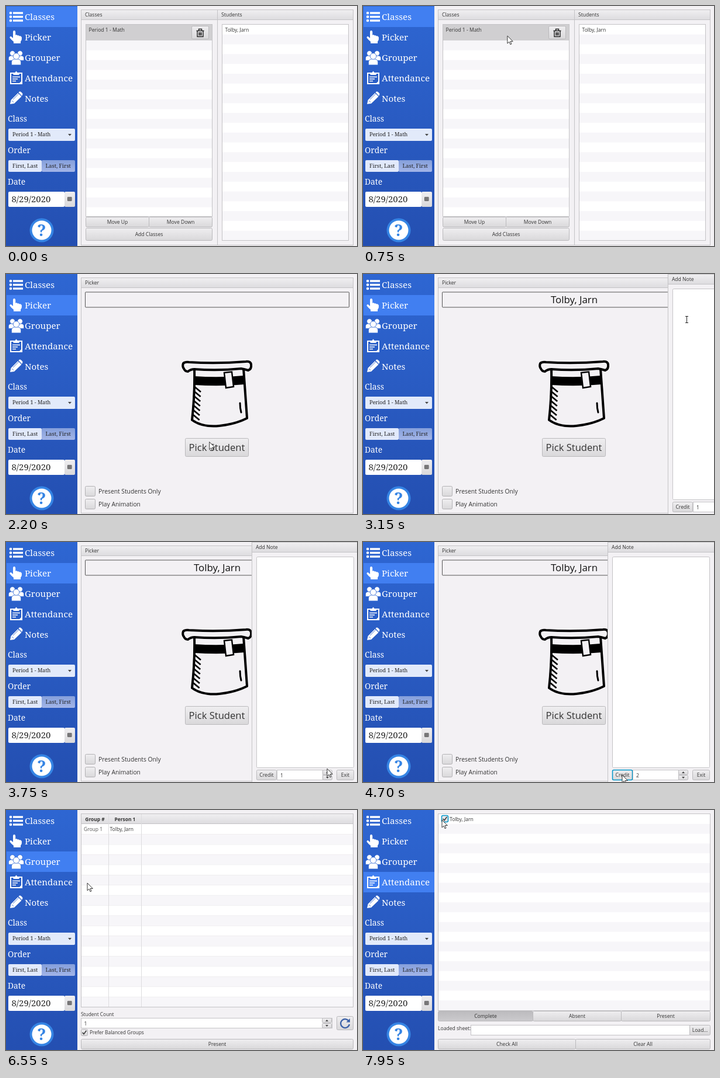
An HTML page for the animation above (8 s loop, 600 by 411 pixels).

```html
<!DOCTYPE html>
<html lang="en">
<head>
<meta charset="utf-8">
<title>Class manager</title>
<style>
html, body { margin: 0; width: 100%; height: 100%; overflow: hidden; background: #f3f1f4; }
svg { display: block; width: 100vw; height: 100vh; }
text { font-family: "Open Sans", "Noto Sans", sans-serif; white-space: pre; }
.serif { font-family: "Noto Serif", serif; }
</style>
</head>
<body>
<svg id="stage" viewBox="0 0 600 411" preserveAspectRatio="none"></svg>
<script>
const LOOP = 8000, STEP = 50;
const STUDENT = 'Tolby, Jarn', CLASS = 'Period 1 - Math';
const BG = '#f3f1f4', INK = '#333', LINE = '#c4c3c6', FOCUS = '#0096c9';
const TABS = ['Classes', 'Picker', 'Grouper', 'Attendance', 'Notes'];

// Markup helpers
const rect = (x, y, w, h, fill, stroke = 'none', more = '') =>
  `<rect x="${x}" y="${y}" width="${w}" height="${h}" fill="${fill}" stroke="${stroke}" ${more}/>`;
const box = (x, y, w, h, fill, stroke = LINE, r = 0) =>
  rect(x + .5, y + .5, w - 1, h - 1, fill, stroke, `rx="${r}"`);
const path = (d, fill = 'none', stroke = 'none', width = 1, more = '') =>
  `<path d="${d}" fill="${fill}" stroke="${stroke}" stroke-width="${width}" ${more}/>`;
const circle = (x, y, r, fill, more = '') => `<circle cx="${x}" cy="${y}" r="${r}" fill="${fill}" ${more}/>`;
const text = (x, y, s, size = 8.6, fill = INK, more = '') =>
  `<text x="${x}" y="${y}" font-size="${size}" fill="${fill}" ${more}>${s}</text>`;
const middle = (x, y, s, size, more = '') => text(x, y, s, size, INK, 'text-anchor="middle" ' + more);
const serif = (x, y, s, size, fill = '#fff') => text(x, y, s, size, fill, 'class="serif"');
const group = (id, body) => `<g id="${id}">${body}</g>`;
const button = (x, y, w, h, label = '', size = 8.6, fill = 'url(#btn)') =>
  box(x, y, w, h, fill, '#bab9bc', 2) + middle(x + w / 2, y + h / 2 + size * .36, label, size);
const header = (x, y, w, h, label) =>
  box(x, y, w, h, 'url(#head)') + text(x + 7, y + h / 2 + 3, label);
const stripes = (x, y, w, bottom, size, first = 0) => {
  let out = '';
  for (let i = 0; y + i * size < bottom; i++) {
    const top = y + i * size;
    if ((i + first) % 2) out += rect(x, top, w, Math.min(size, bottom - top), '#f7f6f9');
  }
  return out;
};
const checkbox = (x, y, size) => box(x, y, size, size, 'url(#btn)', '#b2b1b4', 2);
const tick = (x, y) => path(`M${x} ${y}l2.3 2.8 4.4-6`, 'none', '#3a3a3a', 1.6);
const spinner = (x, y, h) => button(x, y, 17, h / 2) + button(x, y + h / 2, 17, h / 2) +
  path(`M${x + 6} ${y + 6}l2.5-3 2.5 3zM${x + 6} ${y + h - 6}l2.5 3 2.5-3z`, '#444');

const defs = `<defs>
  <linearGradient id="side" x2="0" y2="1"><stop stop-color="#2e66d2"/><stop offset="1" stop-color="#244fb1"/></linearGradient>
  <linearGradient id="btn" x2="0" y2="1"><stop stop-color="#efeef0"/><stop offset="1" stop-color="#d9d8da"/></linearGradient>
  <linearGradient id="head" x2="0" y2="1"><stop stop-color="#f0eff1"/><stop offset="1" stop-color="#dddcdf"/></linearGradient>
  <linearGradient id="down" x2="0" y2="1"><stop stop-color="#bcbbbe"/><stop offset="1" stop-color="#cbcacd"/></linearGradient>
  <linearGradient id="toggle" x2="0" y2="1"><stop stop-color="#859fdb"/><stop offset="1" stop-color="#a3b5e8"/></linearGradient>
</defs>`;

function icons() {
  const gap = '#3068d4';
  const rows = [12, 18.5, 25].map(y => circle(8, y, 2.3, '#fff') + rect(12, y - 1.7, 17, 3.4, '#fff')).join('');
  const hand = path('M12 45Q12 42 14 42Q16.2 42 16.2 45V50Q18 48.5 19.5 50.5Q21.5 49.5 22.8 51.5Q26 50.5 27 54Q27.5 58 25 61V64H13V61Q10 59 6.5 54.5Q6 52 8.5 52L12 55Z', '#fff');
  const person = (x, y, s) =>
    path(`M${x - 7 * s} ${y + 13 * s}V${y + 9 * s}Q${x - 7 * s} ${y + 4 * s} ${x} ${y + 4 * s}Q${x + 7 * s} ${y + 4 * s} ${x + 7 * s} ${y + 9 * s}V${y + 13 * s}Z`, '#fff', gap, .8) +
    circle(x, y, 4.6 * s, '#fff', `stroke="${gap}" stroke-width=".8"`);
  const people = person(11, 81, .95) + person(24, 81, .95) + person(17.5, 86, 1.15);
  const board = path('M8 115H27V133H8Z', 'none', '#fff', 2) + path('M12.500 118V114.500H15L17.500 111.500L20 114.500H22.500V118Z', '#fff') +
    path('M11 121.500H24M11 125H20M11 128.500H17', 'none', '#fff', 1.7) + path('M22 133L27 128V133Z', '#fff');
  const pencil = path('M7 168L8.5 161L20.5 149L26.5 155L14 167ZM21.5 148L23 146.5Q24.5 146 26 147.5L28 149.5Q29 151 28 152.5L27 154Z', '#fff') +
    path('M10 162L13 165M12 160L22 150', 'none', '#2a5fca', .8);
  return rows + hand + people + board + pencil;
}

function sidebar() {
  return rect(0, 0, 122, 411, 'url(#side)') +
    rect(1, 0, 121, 35, '#417ff1', 'none', 'id="active"') +
    rect(1, 0, 121, 35, '#628ff0', 'none', 'id="hover"') + icons() +
    TABS.map((name, i) => serif(32, 23.5 + i * 35, name, 15.1)).join('') +
    ['Class', 'Order', 'Date'].map((name, i) => serif(3, 198 + i * 54, name, 13.8)).join('') +
    rect(4, 210, 114, 21, '#e2eafa', 'none', 'rx="2"') + serif(11, 223.4, CLASS, 9, '#222') +
    path('M106 219h6l-3 3.5z', '#4a4a4a') +
    rect(4, 264, 57, 20, '#e1e9fb', 'none', 'rx="2"') + rect(61, 264, 57, 20, 'url(#toggle)', 'none', 'rx="2"') +
    serif(11, 277.4, 'First, Last', 9.25, '#222') + serif(67.5, 277.4, 'Last, First', 9.25, '#222') +
    rect(4, 318, 96, 26, '#fff', 'none', 'rx="2"') + rect(100, 318, 18, 26, 'url(#btn)', 'none', 'rx="2"') +
    serif(9.5, 336, '8/29/2020', 14.9, '#222') +
    path('M105.5 327.5h6.5v6h-6.5zM105 329.5h7M105 331.5h7M107.6 328v6M109.8 328v6', 'none', '#444', .9) +
    circle(61, 384, 20.5, '#3584e4') + circle(61, 384, 16.5, '#fff') +
    text(61, 393.5, '?', 27, '#3584e4', 'class="serif" font-weight="bold" text-anchor="middle"');
}

function classesPage() {
  const trash = path('M325.5 42.5h13M329.5 42v-2.5h5v2.5M327 43v9.5h10v-9.5M330 45v5.5M332 45v5.5M334 45v5.5', 'none', '#222', 1.4);
  return box(128, 6, 234, 404, BG) + box(361, 6, 233, 404, BG) +
    header(128, 6, 234, 18, 'Classes') + header(361, 6, 233, 18, 'Students') +
    box(136, 31, 217, 330, '#fff') + stripes(137, 59, 215, 360, 16.8, 1) +
    rect(137, 32, 215, 27, '#d0cfd1', 'none', 'id="row"') +
    rect(136.5, 31.5, 216, 329, 'none', FOCUS, 'id="listFocus" stroke-width="1.5"') +
    text(141.5, 44, CLASS) + button(317, 34, 30, 23) + trash +
    button(136, 361, 109, 18, 'Move Up') + button(244, 361, 109, 18, 'Move Down') + button(136, 380, 217, 22, 'Add Classes') +
    box(369, 31, 217, 371, '#fff') + stripes(370, 32, 215, 401, 16.8) + text(374.5, 44, STUDENT);
}

function hat() {
  let hatch = '';
  for (let y = 192; y < 248; y += 8) hatch += `M${321 - (y - 192) * .05} ${y}l12 10`;
  return path('M322 162Q323 205 318 250Q336 263 365 260Q392 257 412 247Q409 205 406 162Z', BG, '#000', 4, 'stroke-linejoin="round"') +
    path(hatch, 'none', '#000', 2.8) +
    path('M322 175Q366 178 406 174L408 189Q366 193 322 190Z', '#000') +
    path('M373 169L386 167.500L389 193L376 195Z', BG, '#000', 2.4) +
    path('M400 221Q400 230 402 237', 'none', '#000', 3, 'stroke-linecap="round"') +
    path('M304 162Q301 158 303 153Q306 150 313 151Q360 154 410 150Q418 149 419 155Q420 163 414 165Q408 163 402 162Q362 166 322 163Q316 163 311 167Q306 167 304 162Z', BG, '#000', 4);
}

function pickerPage() {
  return box(128, 6, 466, 404, BG) + header(128, 6, 466, 18, 'Picker') +
    box(135, 30.5, 452, 27, BG, '#555', 1) + text(361, 50, STUDENT, 16.9, '#111', 'id="picked" text-anchor="middle"') + hat() +
    button(306, 281, 109, 32, 'Pick Student', 16.6) +
    checkbox(135, 363, 18) + text(158, 376, 'Present Students Only', 10.3) +
    checkbox(135, 385, 18) + text(158, 398, 'Play Animation', 10.3);
}

// Drawn at x = 0 and slid into place
function notePanel() {
  return rect(0, 0, 190, 411, BG) + rect(0, 0, 1, 411, LINE) + header(0, 0, 190, 18, 'Add Note') +
    box(8, 25, 167, 362, '#fff', LINE, 2) + text(14.5, 38, '+2 Credit 08/29/2020@01:55 PM', 8.4, INK, 'id="note"') +
    button(8, 390, 35, 18, 'Credit') + rect(8.5, 390.5, 34, 17, 'none', FOCUS, 'id="creditFocus" stroke-width="1.5" rx="2"') +
    box(43, 390, 79, 18, '#fff') + text(49, 402.5, '1', 8.6, INK, 'id="credit"') +
    spinner(121, 390, 18) + button(145, 390, 30, 18, 'Exit');
}

function grouperPage() {
  const size = 17.4;
  let grid = '';
  for (let y = 24 + size; y < 336; y += size) grid += rect(129, y, 464, .6, '#e9e8ea');
  return box(128, 6, 466, 332, '#fff') + stripes(129, 24, 464, 337, size) + grid +
    box(128, 6, 466, 18, 'url(#head)') + rect(175, 7, 1, 330, '#dddcdf') + rect(231, 7, 1, 330, '#dddcdf') +
    middle(152, 18.5, 'Group #', 8.4, 'font-weight="bold"') + middle(203.5, 18.5, 'Person 1', 8.4, 'font-weight="bold"') +
    text(133, 36, 'Group 1', 8.5, '#555') + text(177.5, 36, STUDENT, 8.5) +
    text(128, 353, 'Student Count', 8.4) + box(128, 356, 430, 18, '#fff') + text(133.5, 368.5, '1') + spinner(540, 356, 18) +
    button(565, 353, 29, 24) +
    path('M586 361.5A7.5 7.5 0 1 0 587 367', 'none', '#3d62a8', 2.3) + path('M588 357v6.5h-6.5z', '#3d62a8') +
    checkbox(128, 375, 12) + tick(130.7, 381) + text(143, 384, 'Prefer Balanced Groups', 8.4) +
    button(128, 392, 466, 18, 'Present');
}

function attendancePage() {
  return box(128, 6, 466, 338, '#fff') + stripes(129, 7, 464, 343, 16.8) +
    checkbox(134, 9, 12) + group('checked', tick(136.7, 15) + rect(134.5, 9.5, 11, 11, 'none', FOCUS, 'rx="2" stroke-width="1.5"')) +
    text(148, 18.5, STUDENT) +
    button(128, 344, 163, 18, 'Complete', 8.6, 'url(#down)') + button(290, 344, 152, 18, 'Absent') + button(441, 344, 153, 18, 'Present') +
    text(128, 377, 'Loaded sheet:') + box(184, 368, 375, 18, '#fff') + button(558, 368, 36, 18, 'Load...') +
    button(128, 392, 236, 18, 'Check All') + button(363, 392, 231, 18, 'Clear All');
}

document.getElementById('stage').innerHTML = defs + rect(0, 0, 600, 411, BG) +
  group('page0', classesPage()) + group('page1', pickerPage() + group('panel', notePanel())) +
  group('page2', grouperPage()) + group('page3', attendancePage()) + sidebar() +
  group('arrow', path('M0 0V13L3.1 10.2L5 14.8L7 13.9L5.100 9.500H9.300Z', '#fff', '#222', .9)) +
  group('beam', path('M-2.5-5.500H2.5M0-5.500V5.500M-2.5 5.500H2.5', 'none', '#222', 1));

const el = id => document.getElementById(id);
const show = (id, on) => { el(id).style.display = on ? '' : 'none'; };
const move = (id, x, y) => el(id).setAttribute('transform', `translate(${x} ${y})`);

// Pointer stops: time, x, y
const POINTER = [
  [400, 400, 210], [800, 240, 44], [1050, 240, 44], [1500, 114, 74], [1700, 74, 54], [1850, 74, 54],
  [2250, 360, 298], [2350, 360, 298], [2550, 366, 46], [2650, 368, 46], [3150, 553.5, 78],
  [3700, 549, 388], [4200, 547, 393], [4600, 443, 399], [5000, 443, 399], [5600, 95, 98],
  [5850, 95, 98], [6250, 444, 330], [6550, 139, 125], [6700, 92, 122], [6950, 92, 122],
  [7500, 136, 17], [8000, 135, 17]
];
const TAB_TIMES = [0, 1800, 5800, 6900];

function pointerAt(t) {
  const i = POINTER.findIndex(stop => stop[0] > t);
  const [t0, x0, y0] = POINTER[i - 1], [t1, x1, y1] = POINTER[i];
  const k = (t - t0) / (t1 - t0), e = k * k * (3 - 2 * k);
  return [x0 + (x1 - x0) * e, y0 + (y1 - y0) * e];
}

// Short acceleration and braking around a constant speed
function slide(k) {
  k = Math.min(1, Math.max(0, k));
  if (k < .2) return 3.125 * k * k;
  return k > .8 ? 1 - 3.125 * (1 - k) ** 2 : 1.25 * k - .125;
}

function render(t) {
  const tab = TAB_TIMES.filter(start => t >= start).length - 1;
  TAB_TIMES.forEach((_, i) => show('page' + i, i === tab));
  el('active').setAttribute('y', tab * 35 + 1);

  const visible = t >= POINTER[0][0];
  const [x, y] = visible ? pointerAt(t) : [300, 300];
  const over = x < 122 && y < 175 ? Math.floor(y / 35) : -1;
  show('hover', over >= 0 && over !== tab);
  el('hover').setAttribute('y', over * 35 + 1);

  const listFocused = t >= 850;
  show('listFocus', listFocused);
  el('row').setAttribute('fill', listFocused ? FOCUS : '#d0cfd1');

  show('picked', t >= 2350);
  const panelX = 600 - 182 * slide((t - 2607) / 1213);
  move('panel', panelX, 0);
  el('credit').textContent = t >= 4050 ? '2' : '1';
  show('note', t >= 4750);
  show('creditFocus', t >= 4700);
  show('checked', t >= 7750);

  const inNote = tab === 1 && x > panelX + 8 && x < panelX + 175 && y > 25 && y < 386;
  show('arrow', visible && !inNote);
  show('beam', visible && inNote);
  move('arrow', x, y);
  move('beam', x, y);
}

function tickFrame() {
  render(Math.floor(performance.now() % LOOP / STEP) * STEP);
  requestAnimationFrame(tickFrame);
}
tickFrame();
</script>
</body>
</html>
```
